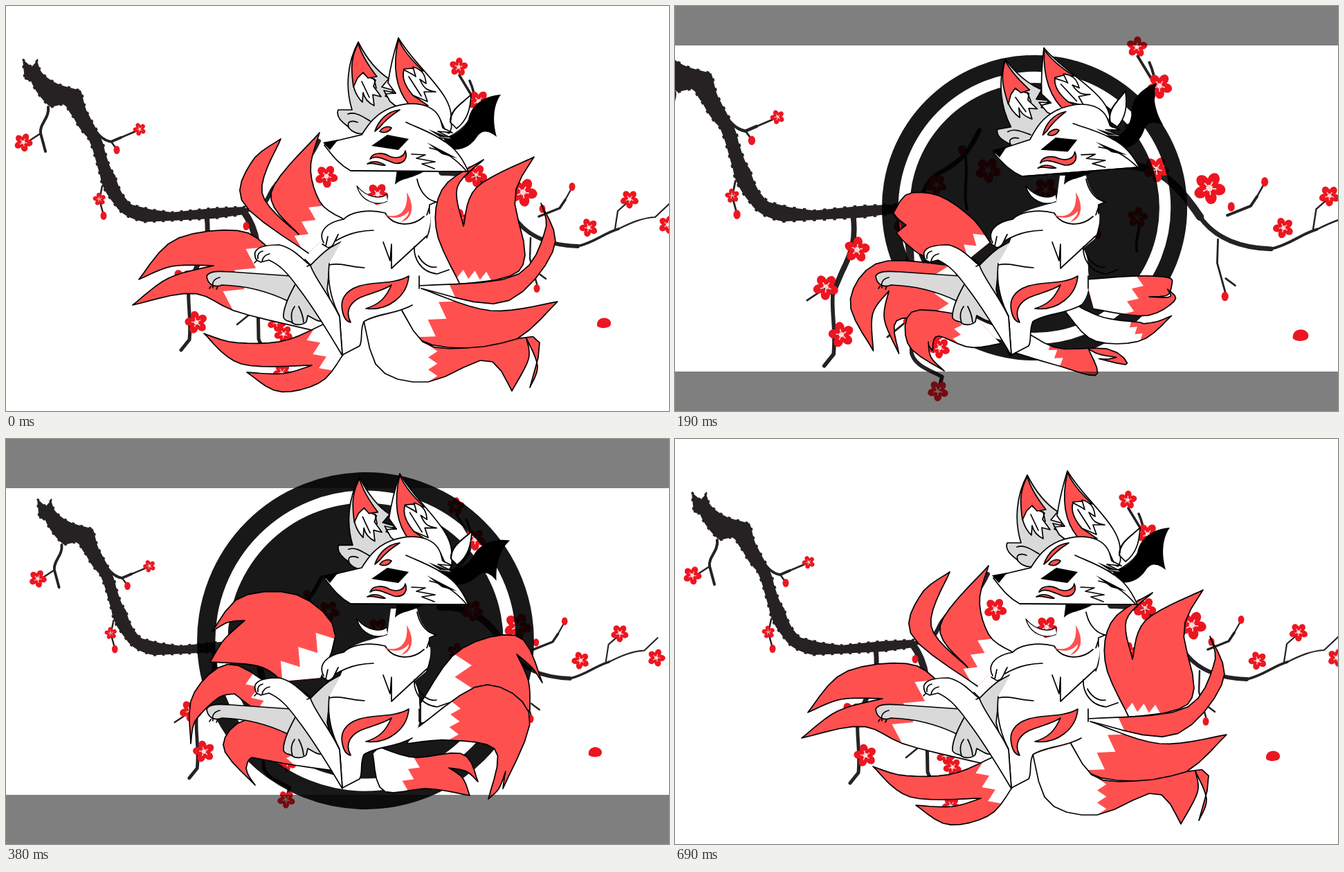
These frames come from a looping animation (958 by 585 pixels, 810 ms). An HTML page:

```html
<!DOCTYPE html>
<html lang="en">
<head>
<meta charset="utf-8">
<title>Fox and blossom</title>
<style>
html, body { margin: 0; width: 100%; height: 100%; overflow: hidden; background: #fff; }
svg { display: block; width: 958px; height: 585px; }
.ink { fill: none; stroke: #000; stroke-width: 1.7; stroke-linejoin: round; stroke-linecap: round; }
.white { fill: #fff; }
.grey { fill: #d9d9d9; }
.red { fill: #ff5050; }
.twig { fill: none; stroke: #262223; stroke-linecap: round; stroke-linejoin: round; }
.bloom { fill: #ec1620; }
</style>
</head>
<body>
<svg viewBox="0 0 958 585">
  <g id="tree">
    <path fill="#262223" stroke="#262223" stroke-width="3" stroke-dasharray="4 9" d="M24 77L37 88L45 79L49 92C55 102 70 112 85 116L108 122C113 135 112 145 120 158C128 175 140 190 143 210C148 225 150 235 158 245C162 262 170 278 182 287L210 294L240 298L300 292L345 290L345 301L300 307L240 310L200 312C180 308 165 300 158 288C145 272 138 260 136 245C130 225 126 205 118 190C108 180 103 172 97 160C88 150 90 145 82 142L65 146C55 140 40 120 36 108L27 106Z"/>
    <g class="twig">
      <path stroke-width="4" d="M61 146C63 162 48 170 50 184L57 210M118 166C130 182 138 194 152 196L166 190"/>
      <path stroke-width="2.5" d="M50 184L30 197M166 190L192 179M152 196L160 207M139 260L135 280L141 302M231 413L255 397M334 460L361 438M758 335L757 365L768 405M768 385L780 394"/>
      <path stroke-width="7" d="M290 304C294 335 288 352 276 376L264 404"/>
      <path stroke-width="5" d="M264 404C262 430 268 450 265 482L253 497M364 427L365 481C370 498 390 503 404 511L400 528"/>
      <path stroke-width="10" d="M343 296C368 330 364 360 362 420M630 240C680 238 704 260 735 306"/>
      <path stroke-width="6" d="M345 295C390 290 370 270 400 250C430 235 440 220 452 195M735 306C755 335 790 346 826 347"/>
      <path stroke-width="3.5" d="M432 216C440 250 430 270 436 296M655 300C662 320 650 335 654 350M826 347C850 342 864 328 885 322M770 304L800 292L808 280M640 190C680 170 684 140 670 108M672 128L655 100"/>
      <path stroke-width="2.2" d="M808 280L818 262M885 322C905 312 920 306 938 305L958 286M880 322L884 296L900 282"/>
    </g>
    <g id="blooms"></g>
    <path class="bloom" d="M854 462C853 452 862 449 868 451C874 453 876 459 872 463C866 466 858 466 854 462Z"/>
  </g>
  <g id="disc" opacity=".9">
    <circle cx="519.5" cy="291.5"/>
    <circle cx="519.5" cy="291.5" fill="none" stroke="#000"/>
  </g>
  <g id="tails"></g>
  <g id="body" class="ink">
    <path class="white" d="M507 260C513 282 535 290 552 282L550 272C542 279 522 278 507 260Z" stroke-width="1.2"/>
    <path class="grey" d="M418 398C435 380 450 362 467 350C490 336 510 328 534 321L537 331C510 342 490 352 468 372L464 410L474 445Z"/>
    <path class="grey" d="M290 390C294 382 310 383 325 384C355 386 385 388 412 390L428 402L407 426C380 413 350 404 312 403C300 408 291 401 290 390Z"/>
    <path class="grey" d="M418 402C408 420 400 438 401 450C404 457 411 454 414 458C418 461 428 462 434 456L436 447C444 451 450 457 460 455L440 408Z"/>
    <path d="M299 407C297 398 301 394 309 392M304 409L306 405M414 458C410 445 414 438 417 434M430 457C429 445 426 440 423 434M296 405L294 408"/>
    <path class="white" d="M500 300C520 290 540 287 551 283L556 245L594 245C598 268 610 281 622 283L612 287C610 300 617 315 608 335L590 350C596 362 597 368 597 382C600 405 597 422 585 433C565 445 535 445 517 455C511 470 516 482 511 491L486 504C484 480 486 470 482 448C470 425 464 400 467 372L482 345Z" stroke="none"/>
    <path d="M594 250C598 270 610 281 622 283L612 287C610 300 617 315 608 335M612 290L608 302M590 347C589 362 597 384 623 387L640 381M596 361C601 371 611 379 622 377M597 390L597 408M587 432C565 445 535 444 517 456C511 470 516 482 511 491L486 504L482 448C470 425 464 400 467 372M467 374C485 370 500 378 518 378"/>
    <path class="white" d="M456 338C455 322 464 313 488 308C498 297 525 293 548 299C566 318 585 315 613 300C615 322 608 332 594 343L557 375C551 360 548 345 531 324C510 324 490 331 475 340C468 351 460 351 456 338Z" stroke="none"/>
    <path d="M459 342C450 326 464 312 488 308C498 297 525 293 548 299C558 317 585 321 604 304M608 332L557 379L557 344L555 368L545 341M531 324C510 324 490 331 475 340C471 350 465 350 462 347L465 333M475 340L480 330M462 347L457 344"/>
    <path class="red" stroke="none" d="M546 301C568 309 582 296 579 269C591 288 588 308 571 312C580 304 582 301 582 296C574 307 558 309 546 301Z"/>
    <path class="white" d="M362 367C355 354 362 345 395 345C416 350 428 366 440 375C447 395 469 420 482 449L486 505C470 478 446 438 423 408C405 383 395 374 380 367L368 370Z"/>
    <path d="M364 365C363 358 366 355 371 354M370 369C371 361 376 359 381 358M362 368L359 371M432 366L440 374L435 376"/>
    <path class="red" d="M582 390C562 402 534 398 512 404C488 411 483 426 486 440C488 451 493 456 498 457C490 442 496 429 512 421C529 414 545 411 557 403C549 421 540 431 520 437C553 441 580 418 582 390Z"/>
    <path fill="#000" stroke="none" d="M565 236L562 258C572 248 584 251 606 238Z"/>
  </g>
  <g opacity=".5"><rect id="top" width="958"/><rect id="low" width="958"/></g>
  <g id="horn"><path d="M632 190C652 187 662 178 668 164C672 143 690 130 715 128C705 142 702 164 709 189C697 180 688 178 680 190C668 207 652 210 638 206Z"/></g>
  <g id="ears" class="ink">
    <path class="grey" d="M509 52C493 82 490 118 500 150L480 150C476 160 486 168 494 174C500 183 512 188 526 182L572 142L548 130L561 122L543 117L553 105C533 92 518 70 509 52Z"/>
    <path class="white" d="M502 115C503 106 509 99 514 95C519 101 526 103 534 107L531 116L542 131L530 128L532 144C524 140 518 134 516 125L515 139C508 132 504 124 502 115Z"/>
    <path class="red" d="M509 54C497 76 499 95 502 117L508 104L516 96L523 104L536 102C525 88 514 72 509 54Z"/>
    <path d="M494 156C505 152 515 160 526 166M495 174C492 166 501 165 508 168M514 109L525 132M535 119L532 105"/>
    <path class="white" d="M567 46C556 82 553 104 552 111L563 126L546 122L555 138L580 158L640 184C644 178 645 173 642 165C643 148 660 140 672 128C671 148 667 165 651 177L642 168C652 130 592 90 567 46Z"/>
    <path class="red" d="M567 48C559 84 562 118 582 142L610 144L588 129C573 110 574 102 575 91L587 90L603 94C589 81 574 65 567 48Z"/>
    <path class="white" d="M588 129C575 114 572 102 575 92C583 97 588 98 592 102L588 88C603 92 606 101 607 112L598 106C604 120 609 122 621 124L604 124L609 138Z"/>
    <path d="M582 102L600 130M563 126L548 127M642 168C643 148 660 140 672 128"/>
  </g>
  <g id="face" class="ink">
    <path class="white" d="M460 201L480 194L514 186C524 170 534 156 556 147C586 136 619 140 628 165L631 176L645 183L624 181L648 193L625 190C642 200 656 211 668 239L498 238C480 228 472 216 460 201Z"/>
    <path fill="#000" stroke="none" d="M458 197L480 193L468 208ZM528 202L551 186L582 192L567 208ZM610 178L641 190L627 189ZM608 197L652 220L630 214Z"/>
    <path d="M578 168C600 178 618 184 634 196M586 214L606 215L593 220L620 225L601 228L619 235M612 205C635 210 649 220 665 238M498 238L668 239M628 165L634 178"/>
    <path class="red" d="M533 181C538 166 550 152 569 150C555 159 546 167 540 175ZM540 181C545 174 553 173 557 176C553 183 545 184 540 181ZM526 221C530 210 546 212 554 217C564 221 575 219 577 209C581 220 575 229 561 227C549 223 536 214 526 221ZM522 228C531 222 540 225 548 230C539 231 531 225 522 228Z"/>
  </g>
</svg>
<script>
const NS = 'http://www.w3.org/2000/svg';
const $ = id => document.getElementById(id);
function add(parent, tag, attrs) {
  const el = document.createElementNS(NS, tag);
  for (const k in attrs) el.setAttribute(k, attrs[k]);
  return parent.appendChild(el);
}
const points = s => s.split(' ').map(p => p.split(',').map(Number));
const mix = (a, b, t) => a + (b - a) * t;
const blend = (p, q, t) => [mix(p[0], q[0], t), mix(p[1], q[1], t)];

function flower(x, y, r) {
  const g = add($('blooms'), 'g', { transform: `translate(${x} ${y}) rotate(${x % 72}) scale(${r})` });
  for (let i = 0; i < 5; i++) {
    const turn = `rotate(${i * 72})`;
    add(g, 'ellipse', { class: 'bloom', cy: -.6, rx: .37, ry: .44, transform: turn });
    add(g, 'path', { d: 'M0 0V-.45', stroke: '#ffd0d0', 'stroke-width': .09, transform: turn });
  }
}
const bud = (x, y) => add($('blooms'), 'ellipse', { class: 'bloom', cx: x, cy: y, rx: 4.5, ry: 6 });

points('295,348 255,396 275,457 683,138 679,245 463,246 537,272').forEach(p => flower(...p, 16));
points('25,197 391,457 401,474 399,529 654,88 842,320 901,279 956,316 397,265 655,307').forEach(p => flower(...p, 13));
points('193,178 135,279 361,435').forEach(p => flower(...p, 9));
flower(747, 269, 20);
points('160,208 141,303 775,293 818,261 767,408 429,220 604,328 492,479 347,318').forEach(p => bud(...p));

// Point on a smooth curve through all of p
function spline(p, t) {
  const u = t * (p.length - 1), i = Math.min(p.length - 2, Math.floor(u)), f = u - i;
  const at = j => p[Math.max(0, Math.min(p.length - 1, j))];
  return [0, 1].map(k => {
    const [a, b, c, d] = [at(i - 1)[k], at(i)[k], at(i + 1)[k], at(i + 2)[k]];
    return b + .5 * f * (c - a + f * (2 * a - 5 * b + 4 * c - d + f * (3 * (b - c) + d - a)));
  });
}
const STEPS = 14;
// Four smooth edges: root to tip, tip to notch, notch to tip, tip to root
function outline(s) {
  let last;
  return s.split('/').flatMap(part => {
    const run = last ? [last, ...points(part)] : points(part);
    last = run[run.length - 1];
    return Array.from({ length: STEPS + 1 }, (_, i) => spline(run, i / STEPS));
  });
}
function swing(p) {
  const [cx, cy] = p[0], a = (cx < 500 ? 6 : -6) * Math.PI / 180;
  const c = Math.cos(a), s = Math.sin(a);
  return p.map(([x, y]) => [cx + (x - cx) * c - (y - cy) * s, cy + (x - cx) * s + (y - cy) * c]);
}
const toPath = p => 'M' + p.map(([x, y]) => x.toFixed(1) + ' ' + y.toFixed(1)).join('L');

// White fur at the root, ending in a zigzag; u and w are the shares of both root edges
function fur(p, u, w) {
  const head = p.slice(0, STEPS + 1), tail = p.slice(-STEPS - 1);
  const a = spline(head, u), b = spline(tail, 1 - w);
  const root = blend(p[0], p[p.length - 1], .5), mid = blend(a, b, .5);
  let n = [a[1] - b[1], b[0] - a[0]];
  const side = n[0] * (mid[0] - root[0]) + n[1] * (mid[1] - root[1]) < 0 ? -.25 : .25;
  const zig = [1, 2, 3, 4, 5].map(i => {
    const [x, y] = blend(a, b, i / 6), k = i % 2 ? side : 0;
    return [x + n[0] * k, y + n[1] * k];
  });
  return [...head.slice(0, Math.ceil(u * STEPS)), a, ...zig, b, ...tail.slice(Math.ceil((1 - w) * STEPS))];
}

// Each pose: white shares of the root edges, then the outline's key points
function tail(...poses) {
  const shapes = poses.map(([u, w, s]) => ({ u, w, edge: outline(s) }));
  shapes.push({ ...shapes[0], edge: swing(shapes[0].edge) });
  const g = $('tails'), id = 'clip' + g.childElementCount;
  const els = [add(add(g, 'clipPath', { id }), 'path', {}), add(g, 'path', { class: 'red' })];
  const patch = add(g, 'path', { class: 'white', 'clip-path': `url(#${id})` });
  els.push(add(g, 'path', { class: 'ink' }));
  return (from, to, t) => {
    const a = shapes[from], b = shapes[to];
    const edge = a.edge.map((p, i) => blend(p, b.edge[i], t));
    els.forEach(el => el.setAttribute('d', toPath(edge)));
    patch.setAttribute('d', toPath(fur(edge, mix(a.u, b.u, t), mix(a.w, b.w, t))) + 'Z');
  };
}

const tails = [
  tail(
    [.05, .2, '655,400 622,325 632,262 690,222/652,262 661,318/680,262 763,218/735,275 750,360 720,393 610,405'],
    [.33, .05, '590,390 670,378 720,340 749,295/733,365 690,410/745,360 785,283/785,360 720,430 640,435'],
    [.33, .33, '597,400 665,402 707,445 687,510/690,470 680,430/685,480 638,535/660,490 640,465 570,440'],
    [.3, .33, '600,380 655,305 740,285 775,352/760,330 738,311/755,350 757,390/720,430 650,410 600,410']),
  tail(
    [.12, .25, '597,404 735,390 779,325 773,285/792,350 720,428 600,408/700,440 797,427/725,487 610,488 572,440'],
    [.5, .33, '590,420 640,440 690,446/695,446 700,446/740,437 780,420/730,485 640,491 575,440'],
    [1, 1, '560,440 600,460 655,468/655,470 655,472/655,474 655,475/615,482 570,475 555,445'],
    [.18, .33, '597,415 690,355 757,400 718,505/720,490 722,480/712,505 697,520/708,450 640,435 580,440']),
  tail(
    [.5, .25, '517,455 540,525 610,543 695,511 731,556/755,510 752,480/768,520 757,551/768,480 690,492 610,490 572,440'],
    [.66, .25, '490,500 600,510 628,517 538,517/570,532 620,541/595,546 570,545/690,555 690,500 600,490 540,450'],
    [.02, .02, '487,500 510,530 590,549 657,474/656,474 656,474/655,474 655,474/600,483 520,497 487,500'],
    [.45, .33, '530,455 545,508 610,505 670,515/660,490 640,475/665,480 682,495/660,455 590,460 540,445']),
  tail(
    [.05, .3, '437,357 343,285 355,225 397,192/370,270 423,330/383,270 453,183/440,235 455,285 488,308'],
    [0, .05, '400,380 335,345 318,305 314,268/325,282 338,288/333,270 328,248/360,290 400,318 455,337'],
    [.02, .12, '420,375 370,382 326,388/325,365 330,345/312,345 303,350/325,262 385,243 440,285 455,345'],
    [.02, .2, '400,350 365,328 295,322/315,290 345,262/320,265 298,278/340,228 420,225 475,275 455,345']),
  tail(
    [.12, .36, '390,360 340,325 245,337 192,395/240,376 300,375/235,393 183,432/270,415 335,442 450,470'],
    [.02, .25, '400,370 290,365 230,430 245,512/255,440 300,398/270,440 287,517/290,460 380,470 450,480'],
    [.02, .25, '400,380 300,376 276,425 328,484/316,450 318,425/335,465 360,487/350,440 430,450'],
    [.2, .4, '400,370 325,325 270,370 267,440/272,410 290,388/310,372 330,368/370,395 420,400']),
  tail(
    [.1, .2, '458,460 400,484 330,486 286,473/340,517 442,519/400,531 348,529/395,557 455,543 488,502'],
    [.12, .33, '470,480 340,456 300,500 362,546/335,525 330,500/332,515 342,530/350,495 420,522 485,497'],
    [.05, .5, '400,420 350,425 375,480 416,508/405,490 402,470/402,467 402,465/415,458 455,478'],
    [.08, .45, '440,425 350,405 314,445 360,500/350,485 347,475/350,465 355,460/410,470 480,480'])
];

// Value at a step, from "step:value" keys
function track(s) {
  const keys = s.split(' ').map(k => k.split(':').map(Number));
  return step => {
    const n = Math.max(1, keys.findIndex(k => k[0] >= step));
    const [a, b] = [keys[n - 1], keys[n]];
    return mix(a[1], b[1], (step - a[0]) / (b[0] - a[0]));
  };
}
const disc = track('0:0 2:213 7:251 9:143 11:0');
const bar = track('0:0 2:44 4:70 6:71 7:42 9:0 11:0');
const zoom = track('0:1 2:1.046 4:1.207 6:.96 7:1.01 9:1 11:1');
const earX = track('0:0 2:-26 4:-42 6:2 7:-19 9:-10 11:0');
const earY = track('0:0 2:7 4:22 6:4 9:0 11:0');
const hornTurn = track('0:0 2:-9 4:-20 6:13 7:-8.5 9:0 11:0');
// Pose numbers 0 to 4, then back to the first
const pose = track('0:0 2:1 4:2 6:3 7:4 9:5 11:5');

const set = (id, k, v) => $(id).setAttribute(k, v);
let shown = -1;

function draw(ms) {
  // Twelve held steps, alternating 60 and 65 ms on average
  const step = Math.min(11, Math.floor((ms + 2) / 62.5));
  if (step === shown) return;
  shown = step;

  const z = zoom(step), r = disc(step), h = bar(step), x = earX(step), horn = hornTurn(step);
  const nod = Math.min(0, horn * .33);
  set('tree', 'transform', `translate(548 317) scale(${z}) translate(-548 -317)`);
  const [core, rim] = $('disc').children;
  core.setAttribute('r', r * .818);
  rim.setAttribute('r', r * .946);
  rim.setAttribute('stroke-width', r * .108);
  set('top', 'height', h);
  set('low', 'height', h);
  set('low', 'y', 585 - h);
  const p = pose(step), from = Math.floor(p);
  tails.forEach(move => move(from % 5, (from + 1) % 5 * (from < 5), p - from));
  set('ears', 'transform', `translate(${x} ${earY(step)}) rotate(${x * .3} 567 46)`);
  set('face', 'transform', `translate(0 ${-nod * .7}) rotate(${nod} 557 200)`);
  set('horn', 'transform', `rotate(${horn} 640 195)`);
}
function tick() {
  draw(performance.now() % 810);
  requestAnimationFrame(tick);
}
tick();
</script>
</body>
</html>
```
